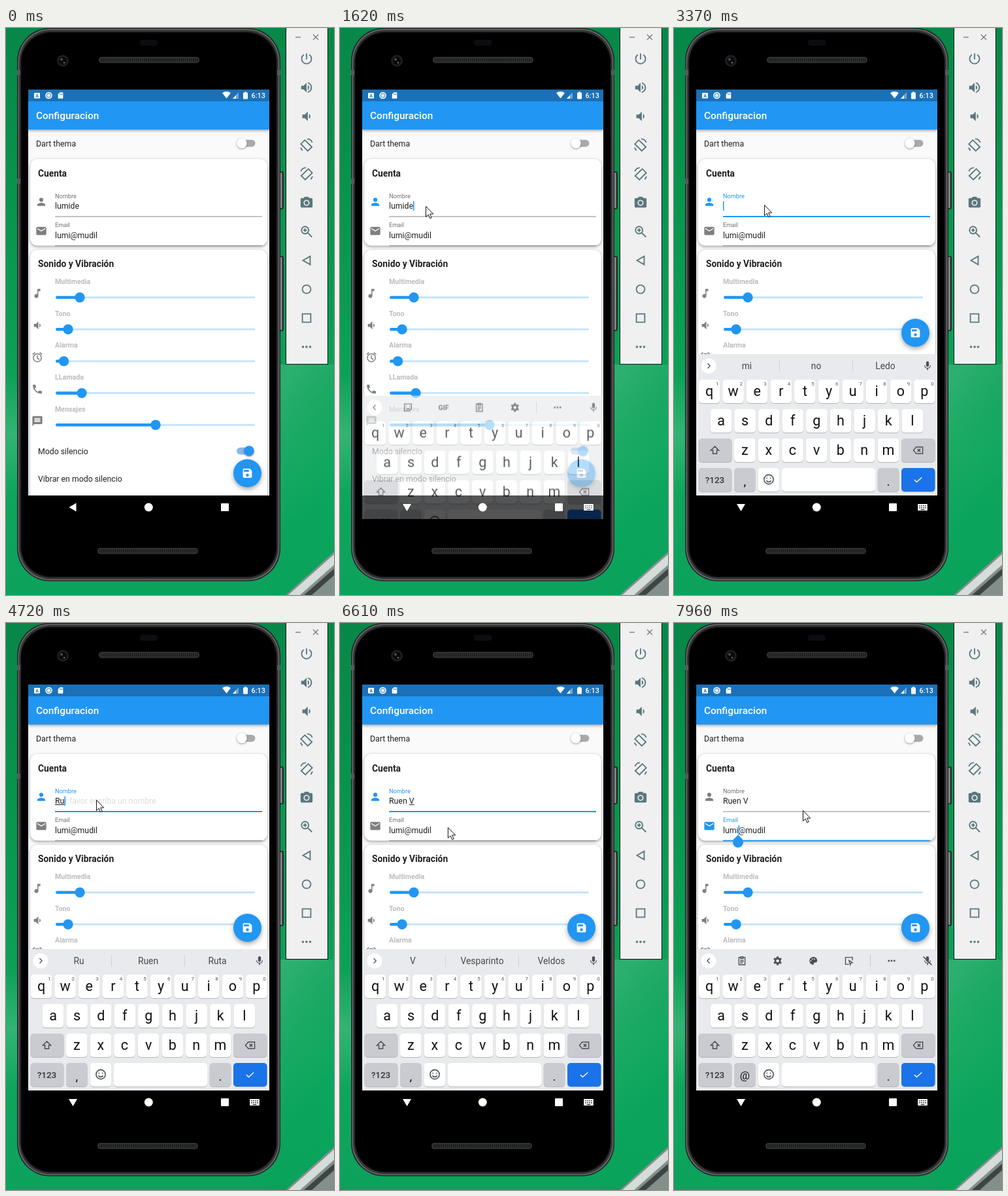
Recreate the animation shown at these times as an HTML page with a canvas. Size 502 px wide and 866 px high, loop 8 s.

```html
<!DOCTYPE html>
<html lang="es">
<head>
<meta charset="utf-8">
<title>Configuracion</title>
<style>
html, body { margin: 0; width: 502px; height: 866px; overflow: hidden; background: #06924b; }
canvas { display: block; }
</style>
</head>
<body>
<canvas id="stage" width="502" height="866"></canvas>
<script>
const stage = document.getElementById('stage').getContext('2d');
const layer = new OffscreenCanvas(502, 866).getContext('2d');
let c = stage;
const LOOP = 8000, BLUE = '#2196f3', INK = '#212121', GREY = '#7f7f7f', TOOL = '#59777d', KEYINK = '#4b4f55';
const BODY_END = 714;

// Icons live on a 24 x 24 grid.
const FILLED = {
  person: 'M12 12a4 4 0 1 0 0-8 4 4 0 0 0 0 8zm0 2c-2.7 0-8 1.3-8 4v2h16v-2c0-2.7-5.3-4-8-4z',
  mail: 'M20 4H4a2 2 0 0 0-2 2v12a2 2 0 0 0 2 2h16a2 2 0 0 0 2-2V6a2 2 0 0 0-2-2zm0 4l-8 5-8-5V6l8 5 8-5z',
  note: 'M12 3v10.5a4 4 0 1 0 2 3.5V7h4V3z',
  low: 'M18.5 12A4.5 4.5 0 0 0 16 8v8a4.5 4.5 0 0 0 2.5-4zM5 9v6h4l5 5V4L9 9z',
  loud: 'M3 9v6h4l5 5V4L7 9zm13.5 3A4.5 4.5 0 0 0 14 8v8a4.5 4.5 0 0 0 2.5-4zM14 3.2v2.1a7 7 0 0 1 0 13.4v2.1a9 9 0 0 0 0-17.6z',
  phone: 'M6.6 10.8a15 15 0 0 0 6.6 6.6l2.2-2.2a1 1 0 0 1 1-.2 11 11 0 0 0 3.6.5 1 1 0 0 1 1 1V20a1 1 0 0 1-1 1A17 17 0 0 1 3 4a1 1 0 0 1 1-1h3.5a1 1 0 0 1 1 1 11 11 0 0 0 .6 3.6 1 1 0 0 1-.3 1z',
  chat: 'M20 2H4a2 2 0 0 0-2 2v18l4-4h14a2 2 0 0 0 2-2V4a2 2 0 0 0-2-2zM6 12h12v2H6zm0-3h12v2H6zm0-3h12v2H6z',
  save: 'M17 3H5a2 2 0 0 0-2 2v14a2 2 0 0 0 2 2h14a2 2 0 0 0 2-2V7zm-5 16a3 3 0 1 1 0-6 3 3 0 0 1 0 6zm3-10H5V5h10z',
  camera: 'M9 2L7.2 4H4a2 2 0 0 0-2 2v12a2 2 0 0 0 2 2h16a2 2 0 0 0 2-2V6a2 2 0 0 0-2-2h-3.2L15 2zm3 15a5 5 0 1 1 0-10 5 5 0 0 1 0 10zm0-1.8a3.2 3.2 0 1 0 0-6.4 3.2 3.2 0 0 0 0 6.4z',
  mic: 'M12 14a3 3 0 0 0 3-3V5a3 3 0 0 0-6 0v6a3 3 0 0 0 3 3zm5.3-3a5.3 5.3 0 0 1-10.6 0H5a7 7 0 0 0 6 6.7V21h2v-3.3a7 7 0 0 0 6-6.7z',
  dots: 'M6 10a2 2 0 1 0 0 4 2 2 0 0 0 0-4zm6 0a2 2 0 1 0 0 4 2 2 0 0 0 0-4zm6 0a2 2 0 1 0 0 4 2 2 0 0 0 0-4z',
  gear: 'M10 2h4l.5 3 2 1 2.8-1.2 2 3.5L19 10.5v3l2.3 2.2-2 3.5-2.8-1.2-2 1-.5 3h-4l-.5-3-2-1-2.8 1.2-2-3.5L5 13.5v-3L2.7 8.3l2-3.5L7.5 6l2-1zM12 8.5a3.5 3.5 0 1 0 0 7 3.5 3.5 0 0 0 0-7z',
  palette: 'M12 3a9 9 0 0 0 0 18 1.5 1.5 0 0 0 1-2.5 1.5 1.5 0 0 1 1-2.5h2a5 5 0 0 0 5-5c0-4.4-4-8-9-8zM5 12a1.5 1.5 0 1 1 3 0 1.5 1.5 0 0 1-3 0zm3-4a1.5 1.5 0 1 1 3 0 1.5 1.5 0 0 1-3 0zm5 0a1.5 1.5 0 1 1 3 0 1.5 1.5 0 0 1-3 0z',
  keys: 'M2 5h20v14H2zM5 8v2h2V8zm4 0v2h2V8zm4 0v2h2V8zm4 0v2h2V8zM5 12v2h2v-2zm4 0v2h2v-2zm4 0v2h2v-2zm4 0v2h2v-2zM8 16v1.5h8V16z',
  wifi: 'M12 21L0 6a19 19 0 0 1 24 0z',
  card: 'M18 2h-8L4 8v12a2 2 0 0 0 2 2h12a2 2 0 0 0 2-2V4a2 2 0 0 0-2-2zM9 6h2v4H9zm3.5 0h2v4h-2zM16 6h2v4h-2z',
};
const OUTLINED = {
  alarm: 'M20 13a8 8 0 1 1-16 0 8 8 0 0 1 16 0M12 8v6l4 2.4M2.5 6.5L7.3 2.6M21.5 6.5l-4.8-3.9',
  power: 'M12 3v10M7.5 5.2a8.2 8.2 0 1 0 9 0',
  rotateLeft: 'M9 3.5l12 11.5-7 6.500L2.500 10zM13 1.500c4 0 7 2 8.500 6M5 21l-3-5',
  rotateRight: 'M15 3.5L3 15l7 6.500L21.500 10zM11 1.500c-4 0-7 2-8.500 6M19 21l3-5',
  zoom: 'M15.5 9.5a6 6 0 1 1-12 0 6 6 0 0 1 12 0M14 14l7 7M6.5 9.5h6M9.5 6.5v6',
  back: 'M18 5v14L6 12z',
  home: 'M19 12a7 7 0 1 1-14 0 7 7 0 0 1 14 0',
  recent: 'M5 5h14v14H5z',
  shift: 'M12 4l8 8h-4v7H8v-7H4z',
  erase: 'M8 5h14v14H8l-6-7zM11 9l6 6M17 9l-6 6',
  smile: 'M21 12a9 9 0 1 1-18 0 9 9 0 0 1 18 0M7.5 14a5 5 0 0 0 9 0M8.5 8.5v2M15.5 8.5v2',
  check: 'M4 12l5 5L20 7',
  left: 'M14.5 6l-6 6 6 6',
  right: 'M9.5 6l6 6-6 6',
  clip: 'M5 4h14v17H5zM9 3h6v4H9zM8 11h8M8 14h8M8 17h5',
  sticker: 'M4 4h16v11l-5 5H4zM8 9v2M16 9v2M8 14a5 5 0 0 0 8 0',
  tablet: 'M12 20H4V4h16v7M12 11l8 5-4 1-1 4z',
  slash: 'M3 3l18 18',
};

function icon(name, x, y, size, color) {
  const solid = FILLED[name];
  c.save();
  c.translate(x - size / 2, y - size / 2);
  c.scale(size / 24, size / 24);
  c.fillStyle = c.strokeStyle = color;
  c.lineWidth = 2;
  const path = new Path2D(solid || OUTLINED[name]);
  solid ? c.fill(path, 'evenodd') : c.stroke(path);
  c.restore();
}
function text(s, x, y, size, color = INK, weight = 400, align = 'left') {
  c.font = `${weight} ${size}px Roboto, sans-serif`;
  c.textAlign = align;
  c.fillStyle = color;
  c.fillText(s, x, y);
}
function rect(x, y, w, h, color) { c.fillStyle = color; c.fillRect(x, y, w, h); }
function round(x, y, w, h, r, color) {
  c.beginPath(); c.roundRect(x, y, w, h, r); c.fillStyle = color; c.fill();
}
function disc(x, y, r, color) {
  c.beginPath(); c.arc(x, y, r, 0, 7); c.fillStyle = color; c.fill();
}
function poly(color, ...pts) {
  c.beginPath();
  for (let i = 0; i < pts.length; i += 2) c.lineTo(pts[i], pts[i + 1]);
  c.closePath(); c.fillStyle = color; c.fill();
}
function shadowed(blur, dy, alpha, draw) {
  c.save();
  c.shadowColor = `rgba(0,0,0,${alpha})`; c.shadowBlur = blur; c.shadowOffsetY = dy;
  draw();
  c.restore();
}
function clipped(y, h, draw) {
  c.save();
  c.beginPath(); c.rect(34, y, 369, h); c.clip();
  draw();
  c.restore();
}
function gradient(x0, y0, x1, y1, ...stops) {
  const g = c.createLinearGradient(x0, y0, x1, y1);
  stops.forEach((s, i) => g.addColorStop(i / (stops.length - 1), s));
  return g;
}
const clamp = v => Math.max(0, Math.min(1, v));
const latest = (list, t) => list.filter(e => e[0] <= t).pop();

// Timeline
const FOCUS = 1420, RESIZE = 1690, EMAIL = 6950;
const NAMES = [ // time, value, start of the underlined word (-1: none)
  [0, 'lumide', -1], [RESIZE, 'lumide', 0], [2700, 'lumid', 0], [2910, 'lumi', 0], [2990, 'lum', 0],
  [3130, 'lu', 0], [3220, 'l', 0], [3320, '', -1], [4580, 'R', 0], [4700, 'Ru', 0], [4860, 'Rue', 0],
  [5000, 'Ruen', 0], [5490, 'Ruen ', -1], [5560, 'Ruen V', -1], [5750, 'Ruen V', 5], [EMAIL, 'Ruen V', -1],
];
const TOOLS_A = ['sticker', 'GIF', 'clip', 'gear'], TOOLS_B = ['clip', 'gear', 'palette', 'tablet'];
const SUGGESTIONS = [
  [RESIZE, 'lumide', 'Lumide', 'Sumide'], [2840, 'lumid', 'Lumide', 'Lúmido'], [2990, 'lum', 'Lumbre', 'lumen'],
  [3130, 'lu', 'luz', 'luego'], [3320, 'mi', 'no', 'Ledo'], [4600, 'R', 'Real', 'Rojo'], [4700, 'Ru', 'Ruen', 'Ruta'],
  [5000, 'Ruen', 'Ruenda', 'Ruedo'], [5490, 'y', 'de', 'es'], [5750, 'V', 'Vesparinto', 'Veldos'],
];
const BLINKS = [[0, 0], [FOCUS, 1], [2170, 0], [2700, 1], [3920, 0], [4390, 1], [6220, 0], [6720, 1]];
const POINTER = [
  [130, 324, 527], [330, 236, 390], [550, 160, 285], [750, 141, 263], [950, 141, 263], [1020, 130, 258],
  [1420, 130, 258], [1550, 131, 272], [2840, 131, 272], [3100, 138, 270], [6420, 138, 270],
  [6610, 165, 312], [6850, 129, 308], [7280, 129, 308], [7620, 98, 314], [7760, 98, 314], [7960, 197, 286],
];

function backdrop() {
  rect(0, 0, 502, 866, gradient(0, 0, 0, 866, '#078748', '#08924c', '#0a9c53', '#10a65d', '#0ca25c'));
  rect(0, 530, 20, 180, gradient(0, 530, 0, 710, 'rgba(130,215,170,0)', 'rgba(130,215,170,.3)', 'rgba(130,215,170,0)'));
  rect(400, 514, 102, 352, gradient(400, 560, 520, 680, 'rgba(120,210,165,.3)', 'rgba(60,185,125,.2)', 'rgba(0,165,90,.2)'));
  poly('#838f8b', 428, 866, 502, 800, 502, 866);
  poly('#d5dcda', 432, 866, 502, 804, 502, 820, 450, 866);
  poly('#3c4542', 456, 866, 502, 826, 502, 836, 468, 866);
}

function phone() {
  for (const [y, h] of [[219, 58], [348, 115]]) {
    round(416, y, 9, h, 3, '#2b2c2d');
    rect(420, y + 2, 2.500, h - 4, '#8b8e90');
  }
  round(17, 0, 403, 845, 50, '#222324');
  round(18.5, 1.5, 400, 842, 49, '#6a6c6e');
  round(20, 3, 397, 839, 48, '#333536');
  round(22.5, 6, 392, 833, 46, '#0c0d0e');
  round(24, 8, 389, 829, 45, '#000');
  for (const [x, y] of [[17, 64], [17, 230], [415, 64]]) rect(x, y, 5, 8, '#55585a');
  round(205, 18, 27, 9, 4, '#0c0d10');
  disc(87, 50, 9, '#1d1e1f'); disc(87, 50, 6, '#08090a'); disc(85, 48, 2, '#4c4f52'); disc(89, 53, 1.2, '#777');
  for (const [x, y] of [[142, 44], [140, 794]]) {
    round(x, y, 154, 9.5, 4.5, '#313233');
    for (let i = 3; i < 151; i += 3) rect(x + i, y + 2, 1.5, 5.5, '#181919');
  }
}

function toolbar() {
  rect(428, 0, 65, 514, '#111');
  rect(429, 0, 63, 513, '#f0f0f0');
  rect(443, 13.5, 8, 1.3, '#777');
  c.strokeStyle = '#777'; c.lineWidth = 1.3;
  c.stroke(new Path2D('M470 10l8 8M478 10l-8 8'));
  ['power', 'loud', 'low', 'rotateLeft', 'rotateRight', 'camera', 'zoom', 'back', 'home', 'recent', 'dots']
    .forEach((name, i) => icon(name, 460, 47 + 44 * i, 22, TOOL));
}

function toggle(x, y, on) {
  round(on ? 353 : 356, y - 5.3, 25.5, 10.7, 5.3, on ? '#88b9e4' : '#aaa');
  shadowed(3, 1, .4, () => disc(x, y, 7.7, on ? BLUE : '#fff'));
}

function field(y, name, label, value, iconOn, active) {
  icon(name, 54, y - 6, 18.4, iconOn ? BLUE : GREY);
  text(label, 75, y - 12, 9.2, active ? BLUE : '#6e6e6e');
  text(value, 75, y + 4.5, 12.3);
  rect(75, y + (active ? 15.5 : 16), 317, active ? 2 : 1, active ? BLUE : '#8a8a8a');
}

function slider(i, label, name, x) {
  const y = 411.5 + 48.7 * i;
  text(label, 75, y - 20.5, 10.7, '#bdbdbd', 700);
  icon(name, 48, y - 6, 18.4, GREY);
  round(77, y - 1.5, 304, 3, 1.5, '#c7e4fc');
  round(76, y - 2.3, x - 76, 4.6, 2.3, BLUE);
  disc(x, y, 7.7, BLUE);
}

function caretAt(x, y) { rect(x, y - 11, 1.5, 14.5, BLUE); }

function app(t) {
  rect(34, 94, 369, 620, '#fafafa');
  shadowed(4, 2, .35, () => rect(34, 112, 369, 43, BLUE));
  rect(34, 94, 369, 18, '#1b70b7');
  text('Configuracion', 46, 139, 15.36, '#fff', 500);
  round(43, 99, 9, 8.5, 1, '#fff');
  text('A', 47.5, 106, 7, '#1b70b7', 700, 'center');
  disc(65.5, 103, 5.3, '#fff'); disc(65.5, 103, 3.8, '#5f9dcf'); disc(65.5, 103, 2.5, '#e5f0f8');
  icon('card', 83.5, 103, 11.5, '#fff');
  icon('wifi', 337.5, 102.5, 13, '#fff');
  poly('#6fa6d3', 347, 108, 356, 98, 356, 108);
  poly('#fff', 347, 108, 352, 102.5, 352, 108);
  round(363, 98.5, 7, 10, 1, '#fff'); rect(365, 97.5, 3, 2, '#fff');
  text('6:13', 375.5, 107, 10.8, '#fff', 500);

  text('Dart thema', 46, 180.5, 12.3);
  toggle(361, 176, false);
  shadowed(4, 1.5, .4, () => { round(37, 200, 363, 132.5, 11, '#fff'); round(37, 339, 363, 395, 11, '#fff'); });
  text('Cuenta', 49, 227, 13.8, INK, 700);

  const inName = t >= FOCUS && t < EMAIL, inEmail = t >= EMAIL;
  const [, value, wordStart] = latest(NAMES, t);
  const hint = t < 4580 ? clamp((t - 3380) / 130) : clamp((4800 - t) / 220);
  text('Por favor escriba un nombre', 75, 276, 12.3, `rgba(0,0,0,${.38 * hint})`);
  field(271.5, 'person', 'Nombre', value, inName, t >= RESIZE && t < EMAIL + 60);
  field(316, 'mail', 'Email', 'lumi@mudil', inEmail, t >= EMAIL + 60);
  c.font = '400 12.3px Roboto, sans-serif';
  const width = s => c.measureText(s).width;
  if (wordStart >= 0) {
    const from = 75 + width(value.slice(0, wordStart));
    rect(from, 277, 75 + width(value) - from, 1, INK);
  }
  if (latest(BLINKS, t)[1]) {
    if (inName) caretAt(75 + width(value), 275.5);
    if (inEmail) caretAt(75 + width(t < 7620 ? 'lumi@mudil' : 'lumi'), 320);
  }

  text('Sonido y Vibración', 49, 365, 13.8, INK, 700);
  slider(0, 'Multimedia', 'note', 113);
  slider(1, 'Tono', 'low', 95);
  slider(2, 'Alarma', 'alarm', 88.5);
  slider(3, 'LLamada', 'phone', 116);
  slider(4, 'Mensajes', 'chat', 229);
  text('Modo silencio', 49, 650.5, 12.3);
  toggle(372, 646, true);
  text('Vibrar en modo silencio', 49, 693, 12.3);

  const fabY = t < RESIZE ? 680 : 465.5;
  shadowed(7, 3, .35, () => disc(369.5, fabY, 21.5, BLUE));
  icon('save', 369.5, fabY, 18.4, '#fff');
  if (t >= 7760) {
    disc(98, 335, 8, BLUE);
    poly(BLUE, 98, 323.5, 105, 331, 91, 331);
  }
}

function key(x, y, w, label, fill = '#fff', size = 21.5) {
  round(x, y + 1, w, 36, 5, '#b4b6bb');
  round(x, y, w, 36, 5, fill);
  if (label) text(label, x + w / 2, y + 18 + size * .34, size, '#111', 400, 'center');
}

function keyboard(t) {
  const dull = '#c9cbd0', words = t >= RESIZE && t < EMAIL;
  rect(34, 498, 369, 256, '#e8eaed');
  disc(53, 516, 11.5, '#fff');
  icon(words ? 'right' : 'left', 53, 516, 15, KEYINK);
  if (words) {
    latest(SUGGESTIONS, t).slice(1).forEach((s, i) => text(s, 111.5 + 106 * i, 521, 13.8, '#45484d', 400, 'center'));
    for (const x of [161, 273]) rect(x, 507, 1, 18, '#cfd1d5');
  } else {
    (t < EMAIL ? TOOLS_A : TOOLS_B).forEach((name, i) => {
      const x = 104 + 54.6 * i;
      name === 'GIF' ? text(name, x, 520, 10.5, KEYINK, 700, 'center') : icon(name, x, 516, 16, KEYINK);
    });
    rect(300, 507, 1, 18, '#c5c7cb');
    icon('dots', 333, 516, 17, KEYINK);
  }
  icon('mic', 388, 516, 17, KEYINK);
  if (t >= EMAIL) icon('slash', 388, 516, 17, KEYINK);

  ['qwertyuiop', 'asdfghjkl', 'zxcvbnm'].forEach((row, r) => [...row].forEach((letter, i) => {
    const x = [37.7, 55.7, 92][r] + 36.6 * i;
    key(x, 537 + 45 * r, 32.6, letter);
    if (!r) text((i + 1) % 10, x + 28.5, 546, 8, '#555', 400, 'center');
  }));
  key(37.5, 627, 51, '', dull); icon('shift', 62.5, 645, 18, KEYINK);
  key(348, 627, 51.5, '', dull); icon('erase', 373.5, 645, 17, KEYINK);
  key(37.5, 672, 51, '', dull); text('?123', 62.5, 694.5, 13.5, '#333', 500, 'center');
  key(92, 672, 32.6, '', dull);
  t < EMAIL ? text(',', 108.3, 699, 19, '#111', 400, 'center') : text('@', 108.3, 696.5, 17, '#111', 400, 'center');
  key(128.6, 672, 32.6, ''); icon('smile', 145, 689.5, 19, KEYINK);
  key(165, 672, 143, '');
  key(311.7, 672, 32.6, '', dull); text('.', 328, 699, 19, '#111', 400, 'center');
  key(348, 672, 51.5, '', '#1a73e8'); icon('check', 373.5, 690, 17, '#fff');
}

// The keyboard is composed on its own layer so that it fades in as one piece.
function keyboardEntrance(t) {
  const p = clamp((t - 1470) / 280);
  if (!p) return;
  c = layer;
  c.clearRect(0, 0, 502, 866);
  keyboard(t);
  c = stage;
  c.globalAlpha = clamp(p * 1.25);
  c.drawImage(layer.canvas, 0, 161 * (1 - p) ** 1.2);
  c.globalAlpha = 1;
}

function navigation(t) {
  const open = t >= 1480, sliding = open && t < 1750;
  rect(34, BODY_END, 369, 750 - BODY_END, sliding ? 'rgba(0,0,0,.5)' : '#000');
  open ? poly('#fff', 96, 727, 109, 727, 102.5, 738) : poly('#fff', 96.5, 732, 107.5, 725.5, 107.5, 738.5);
  disc(218.3, 732, 6.5, '#fff');
  round(329, 726, 12, 12, 1, '#fff');
  if (open) icon('keys', 380.5, 732, 17.5, '#fff');
}

function pointer(t) {
  if (t < POINTER[0][0]) return;
  const i = POINTER.findLastIndex(k => k[0] <= t);
  const a = POINTER[i], b = POINTER[i + 1] || a;
  const p = a === b ? 0 : (t - a[0]) / (b[0] - a[0]);
  c.save();
  c.translate(a[1] + (b[1] - a[1]) * p, a[2] + (b[2] - a[2]) * p);
  const arrow = new Path2D('M.5 .5v16l3.7-3.5 2.5 5.8 2.5-1.1-2.5-5.6h5z');
  c.fillStyle = '#fff'; c.fill(arrow);
  c.strokeStyle = '#111'; c.lineWidth = 1; c.stroke(arrow);
  c.restore();
}

function draw(now) {
  const t = now % LOOP;
  backdrop();
  phone();
  toolbar();
  clipped(94, BODY_END - 94, () => app(t));
  clipped(94, 656, () => { keyboardEntrance(t); navigation(t); });
  pointer(t);
  requestAnimationFrame(draw);
}
requestAnimationFrame(draw);
</script>
</body>
</html>
```
